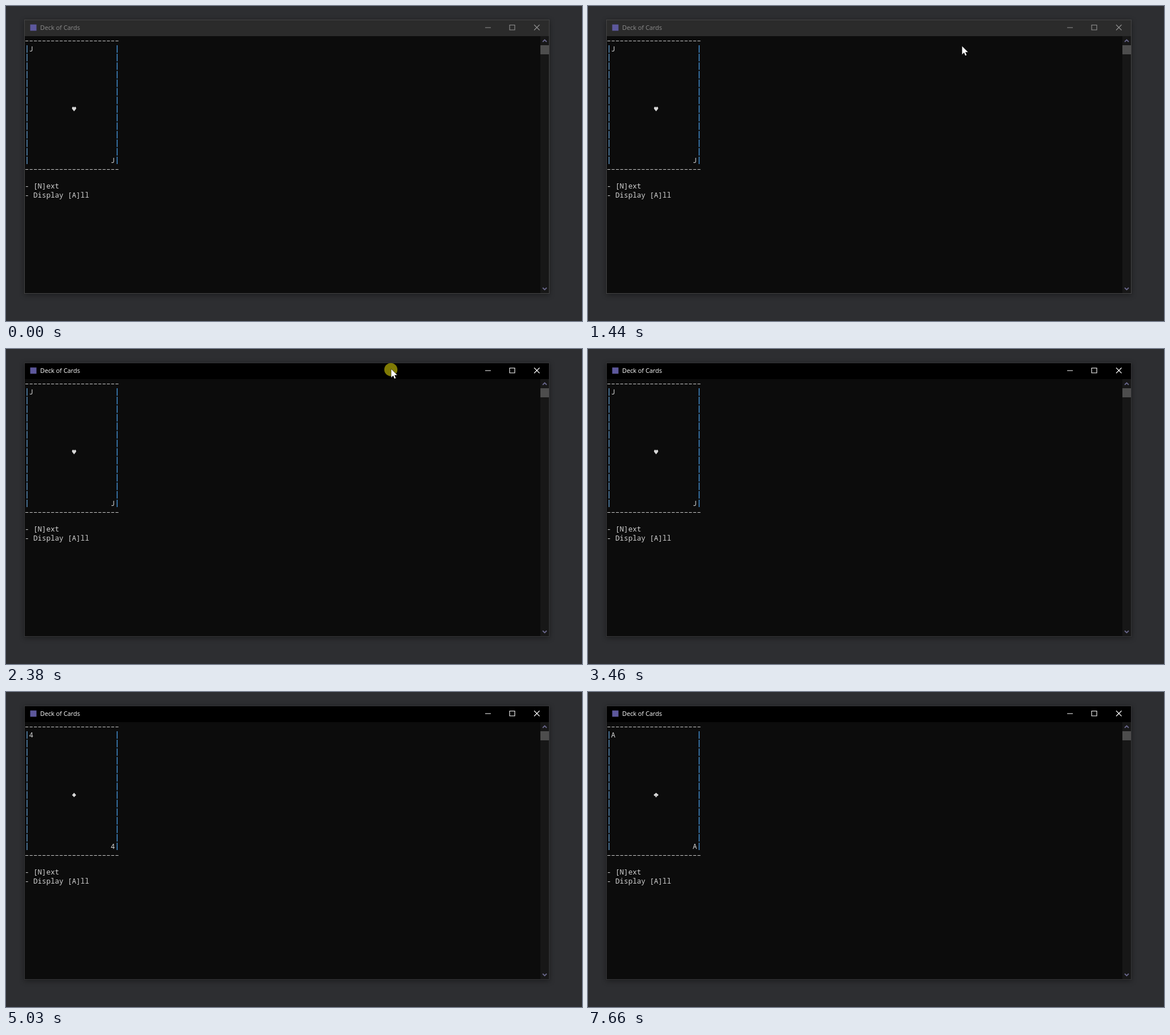
Animation, 1011 px wide and 554 px high, one loop 8000 ms. Source, as an HTML page:

```html
<!DOCTYPE html>
<html lang="en">
<head>
<meta charset="utf-8">
<title>Deck of Cards</title>
<style>
  html, body { margin: 0; width: 100%; height: 100%; overflow: hidden; background: #2d2e31; }
  svg { display: block; width: 1011px; height: 554px; }
  .window { filter: drop-shadow(0 2px 5px rgba(0, 0, 0, .4)); }
  .title { font: 10.9px "Open Sans", "Noto Sans", sans-serif; }
  .mono { font: 12.555px "Noto Sans Mono", "DejaVu Sans Mono", monospace; fill: #d2d2d2; white-space: pre; }
  .line { fill: none; }
</style>
</head>
<body>
<svg viewBox="0 0 1011 554" xmlns="http://www.w3.org/2000/svg">
  <rect width="1011" height="554" fill="#2d2e31"/>
  <rect class="window" x="32" y="24" width="922" height="482" fill="#0c0c0c"/>
  <rect id="bar" x="33" y="24" width="921" height="29"/>
  <rect id="frame" class="line" x="32.5" y="24.5" width="921" height="481"/>
  <rect x="42.5" y="32.5" width="11" height="11" fill="#5d589c"/>
  <text id="title" class="title" x="60" y="42">Deck of Cards</text>
  <path id="buttons" class="line" stroke-width="1.1" d="M841 38h10M884 33.5h9v8.500h-9zM927 33l9.500 9.500m0-9.500l-9.500 9.500"/>

  <rect x="938" y="53" width="15" height="452" fill="#171717"/>
  <rect x="938" y="69" width="15" height="16" fill="#4d4d4d"/>
  <path class="line" d="M942 63l3.500-3.500 3.500 3.500M942 495.500l3.500 3.500 3.500-3.500" stroke="#68668a" stroke-width="1.8"/>

  <g id="screen">
    <path d="M34 61.500H198M34 287.500H198" stroke="#ccc" stroke-dasharray="5.2 2.333"/>
    <g stroke-width="1.6" stroke-dasharray="13.2 1.87">
      <path d="M36.900 69V279" stroke="#5486b0"/>
      <path d="M195.100 69V279" stroke="#3f86c2"/>
    </g>
    <path id="suit" transform="translate(119.5 181.200) scale(.9)" fill="#d8d8d8"/>
  </g>
  <rect id="caret" x="33" y="350.300" width="8" height="3.800" fill="#f2f2f2"/>

  <circle id="click" cx="675.500" cy="36.200" r="11.500" fill="#7f7a04"/>
  <path id="mouse" d="M0 0V15.500L3.600 12 5.800 17.400 8.400 16.200 6.200 11.100H11z"
        fill="#fff" stroke="#000" stroke-width=".5"/>
</svg>
<script>
const LOOP = 8000;
const CELL = 7.533, ROW = 15.07;
const FOCUS = 2380;      // the click that activates the window
const BLINK = 535;       // half a caret period
const REDRAW = 60;       // time the console takes to print a card
const MOUSE_STEP = 76;   // pointer sampling interval

const el = id => document.getElementById(id);
const show = (id, on) => el(id).setAttribute("visibility", on ? "visible" : "hidden");
const paint = (id, attrs) => {
  for (const name in attrs) el(id).setAttribute(name, attrs[name]);
};
const within = (t, start, length) => t >= start && t < start + length;
const mix = (a, b, k) => a + (b - a) * k;
const easeOut = (u, power) => 1 - (1 - u) ** power;

function print(row, column, text = "") {
  const node = document.createElementNS("http://www.w3.org/2000/svg", "text");
  node.setAttribute("class", "mono");
  node.setAttribute("x", 33 + column * CELL);
  node.setAttribute("y", 65.3 + row * ROW);
  node.textContent = text;
  el("screen").append(node);
  return node;
}
const ranks = [print(1, 1), print(14, 20)];
print(17, 0, "- [N]ext");
print(18, 0, "- Display [A]ll");

const HEART = "M0 4.5L-4 -.5V-2.5Q-3.5 -4.3 -2 -4.3 -.5 -4.3 0 -2.8 .5 -4.3 2 -4.3 3.5 -4.3 4 -2.5V-.5z";
const DIAMOND = "M0-4.3L4 0 0 4.300-4 0z";
const CLUB = "M-2-2a2 2 0 1 1 4 0 2 2 0 1 1-1.3 3L1.800 4H-1.800L-.7 1a2 2 0 1 1-1.300-3z";

// The caret stays lit until `solid`, then blinks.
const cards = [
  { at: 0, rank: "J", suit: HEART, solid: FOCUS },
  { at: 4100, rank: "4", suit: DIAMOND, solid: 5030, clears: true },
  { at: 7050, rank: "A", suit: CLUB, solid: 7660 }
];

// Number of sampled steps since a start time, as a fraction of the whole move.
const progress = (t, start, steps) =>
  Math.min(Math.max(Math.floor((t - start) / MOUSE_STEP), 0), steps) / steps;

function pointerAt(t) {
  if (within(t, 130, 70)) return [595, 551];
  const rise = progress(t, 1060, 8);
  const settle = progress(t, 1980 - MOUSE_STEP, 2);
  return [
    mix(512, 680, easeOut(rise, 2)) - 4 * settle,
    mix(427, 22, easeOut(rise, 2.17)) + 13 * settle
  ];
}

function render(t) {
  const active = t >= FOCUS;
  paint("bar", { fill: active ? "#000" : "#2b2b2b" });
  paint("frame", { stroke: active ? "#353537" : "#454545" });
  paint("title", { fill: active ? "#fff" : "#8c8c8c" });
  paint("buttons", { stroke: active ? "#fff" : "#929292" });

  const card = cards.filter(({ at }) => at <= t).pop();
  const printing = within(t, card.at, REDRAW);
  for (const node of ranks) node.textContent = card.rank;
  paint("suit", { d: card.suit });
  show("screen", !(printing && card.clears));
  const lit = t < card.solid || Math.floor((t - card.solid) / BLINK) % 2 === 1;
  show("caret", active && !printing && lit);

  paint("mouse", { transform: `translate(${pointerAt(t)})` });
  show("mouse", within(t, 130, 70) || within(t, 1060, 1620));
  show("click", within(t, FOCUS, 150));
}

const origin = performance.now();
function tick() {
  render((performance.now() - origin) % LOOP);
  requestAnimationFrame(tick);
}
tick();
</script>
</body>
</html>
```
